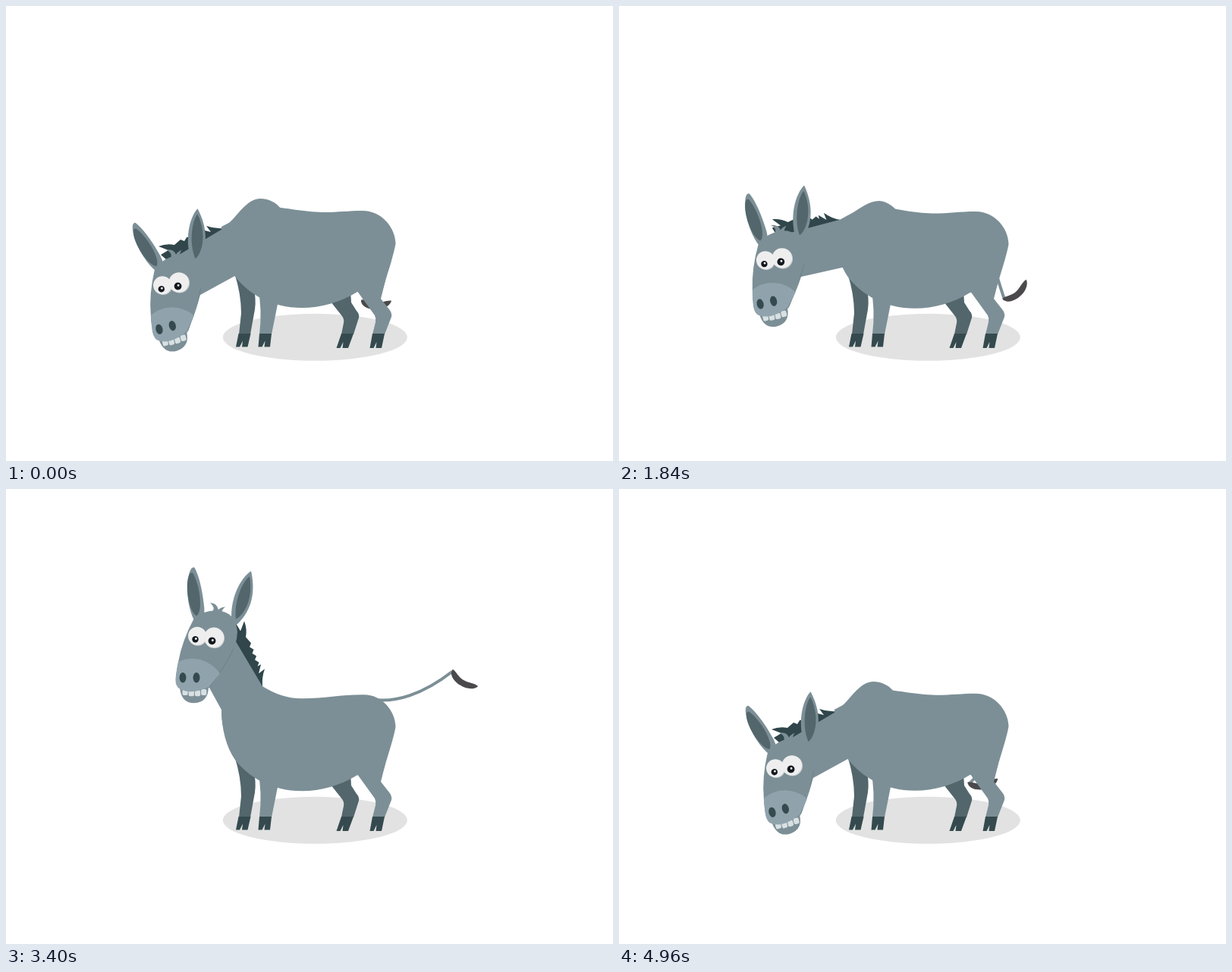
Animation, 800 px wide and 600 px high, one loop 5 s. Source, as an HTML page with a canvas:

```html
<!DOCTYPE html>
<html lang="en">
<head>
<meta charset="utf-8">
<title>Donkey</title>
<style>
html, body { margin: 0; width: 100%; height: 100%; overflow: hidden; background: #fff; }
canvas { display: block; }
</style>
</head>
<body>
<canvas id="stage" width="800" height="600"></canvas>
<script>
const ctx = document.getElementById('stage').getContext('2d');
const LOOP = 5000, STEP = 40, TAU = 2 * Math.PI, DEG = Math.PI / 180;
const COLOR = {
  coat: '#7c8f96', far: '#52666c', hoof: '#354a4e', mane: '#30464b', muzzle: '#90a3ad',
  line: '#6c8088', tooth: '#d8e0e3', tuft: '#4b494c', grass: '#9aae3d', ray: '#424247', shadow: '#e2e2e2'
};
const SHOULDER = [329, 302], SKULL = [266.8, 193.3];
const GRASS_START = 440, GRASS_END = 1660;
const BRAY_START = 2350, BRAY_LENGTH = 480;

const SHAPES = {
  tuft: 'M-1-3C5-3 10 2 18 2C26 2 32-2 39-1C38 5 28 11 18 10C8 10-2 5-1-3Z',
  farLegs: `M301 352Q310 380 310 405L307 433H322L328 400Q330 385 326 370Z
    M428 390L443 409Q446 413 445 418L442 433H458L465 411Q466 406 462 402L455 391L454 375Z`,
  nearLegs: `M332 372Q338 400 334 433H350L359 388Z
    M460 372L486 408Q488 412 487 417L483 433H499L508 410Q509 405 505 400L494 386L500 362L480 350Z`,
  mane: manePath(),
  neck: `M272 185L303 201L338 260L351 273C362 283 377 294 377 308C377 320 371 330 364 335
    Q345 350 325 349C296 346 284 325 284 291L250 229Z`,
  skull: 'M247 172Q258 160 278 160Q302 161 305 188Q304 206 296 220L268 262H228Q221 255 227 228Q232 200 247 172Z',
  cheek: 'M300 210Q292 228 281 243L269 260',
  muzzle: 'M227 228Q240 221 257 225Q273 230 282 243L268 260Q258 266 244 267Q234 267 227 262Q222 257 224 245Z',
  forelock: 'M271 163Q277 156 269 150Q278 150 280 159Q282 156 289 155Q285 158 284 163Z',
  leftEar: 'M248 103C240 105 235 145 248 173L259 172Q263 164 261 150Q258 120 251 105Q250 102 248 103Z',
  leftInner: 'M244 111C236 121 240 160 251 167C260 162 257 128 248 111Q246 109 244 111Z',
  rightEar: 'M323 108C310 116 293 145 298 180Q303 182 312 170C328 150 327 125 323 108Z',
  rightInner: 'M321 115C312 121 300 148 303 171C312 168 327 145 321 115Z'
};
for (const key in SHAPES) SHAPES[key] = new Path2D(SHAPES[key]);

function manePath() {
  let path = 'M296 185L303 177L309 187L314 174Q318 184 316 195';
  for (let i = 0; i < 4; i++) {
    const x = 321 + 3.5 * i, y = 203 + 8.5 * i;
    path += `L${x + 2} ${y}L${x} ${y + 5}`;
  }
  return path + 'L336 231L333 243L341 237Q337 248 338 260L325 260Z';
}

const mix = (a, b, k) => a + (b - a) * k;
const wave = (phase, peak) => Math.cos(TAU * (phase - peak));

// Eased 0 to 1 between two times.
function ramp(t, from, to) {
  const k = Math.min(1, Math.max(0, (t - from) / (to - from)));
  return k * k * (3 - 2 * k);
}

function poseAt(t) {
  const lift = ramp(t, 1700, 2220) - ramp(t, 4120, 4700);
  const dip = ramp(t, 60, 440) - ramp(t, 440, 1100);
  const recoil = 1 + 0.2 * wave(t / 384, 2520 / 384);
  const bray = (ramp(t, 2300, 2500) - ramp(t, 3160, 3360)) * recoil;
  return {
    lift, dip, bray,
    neck: -90 * (1 - lift) - 5.5 * dip,
    head: -15 * (1 - lift) + 5 * dip + 7 * bray,
    ear: -4 - 6 * wave(t / LOOP, 0) + 5 * bray + 5 * dip,
    bob: 1.3 * Math.sin(3 * TAU * t / LOOP)
  };
}

function fill(shape, color) {
  ctx.fillStyle = color;
  ctx.fill(shape);
}

function oval(x, y, rx, ry, color) {
  ctx.beginPath();
  ctx.ellipse(x, y, rx, ry, 0, 0, TAU);
  ctx.fillStyle = color;
  ctx.fill();
}

function group(draw) {
  ctx.save();
  draw();
  ctx.restore();
}

function turnAt(x, y, degrees) {
  ctx.translate(x, y);
  ctx.rotate(degrees * DEG);
  ctx.translate(-x, -y);
}

// A pendulum whose bend and tuft follow the swing with a delay.
function drawTail(phase) {
  const swing = 38 + 58 * wave(phase, 0.98) - 6 * Math.sin(3 * TAU * phase);
  const bend = -65 * wave(phase, 0.1);
  const tuft = -35 + 85 * wave(phase, 0.38);
  const reach = 114;
  group(() => {
    ctx.translate(480, 277);
    ctx.rotate(swing * DEG);
    ctx.beginPath();
    ctx.moveTo(0, 0);
    ctx.bezierCurveTo(reach * 0.25, bend * 0.8, reach * 0.6, bend * 0.8, reach, 0);
    ctx.strokeStyle = COLOR.coat;
    ctx.lineWidth = 4;
    ctx.stroke();
    ctx.translate(reach, 0);
    ctx.rotate(tuft * DEG);
    fill(SHAPES.tuft, COLOR.tuft);
  });
}

function drawHoof(top, bottom, y) {
  fill(new Path2D(`M${top} 432h16L${bottom + 15} ${y}h-7.5l1-8l-4 8h-5Z`), COLOR.hoof);
}

function drawBody(lift) {
  const up = (low, high) => mix(low, high, lift);
  fill(new Path2D(`M338 ${up(263, 260)}
    C${up(375, 355)} ${up(267, 270)} ${up(390, 370)} ${up(271, 276)} ${up(418, 390)} ${up(272, 276)}
    C${up(440, 420)} ${up(272, 276)} ${up(450, 440)} ${up(270, 271)} 470 ${up(270, 271)}
    C495 270 513 292 513.5 313C512 325 502 355 495 380L463 377
    C440 391 415 398 390 398C350 398 320 380 302 357C290 340 284 315 284 291Z`), COLOR.coat);
}

function drawTeeth(x, y, width, height, count) {
  ctx.fillStyle = COLOR.tooth;
  for (let i = 0; i < count; i++) {
    const arch = 2 * Math.sin(Math.PI * (i + 0.5) / count);
    ctx.beginPath();
    ctx.roundRect(x + i * (width + 1), y + arch, width, height, 2);
    ctx.fill();
  }
}

function drawEye(x, y, r, pupil, look) {
  oval(x + 0.8, y + 1, r, r, '#c9cfd2');
  oval(x, y, r, r, '#eeeeee');
  const px = x - 2.5 * look, py = y + 4.5 * look;
  oval(px, py, pupil, pupil, '#14191f');
  oval(px + 0.8, py - 0.8, 1.4, 1.4, '#fff');
}

function drawBlade(x, y, angle, length) {
  group(() => {
    ctx.translate(x, y);
    ctx.rotate(angle * DEG);
    const mid = length * 0.55;
    fill(new Path2D(`M-3 0Q${mid} 6 ${length} 0Q${mid}-6-3 0Z`), COLOR.grass);
  });
}

function drawGrass(t) {
  const eaten = (t - GRASS_START) / (GRASS_END - GRASS_START);
  if (eaten < 0 || eaten >= 1) return;
  const size = 1.05 * (1 - eaten ** 5);
  group(() => {
    ctx.translate(244, 270.5);
    ctx.rotate(12 * DEG);
    ctx.scale(size, size);
    for (const spread of [-1, 0, 1]) {
      drawBlade(-9, -1, 153 + 15 * spread, 34 + 3 * spread * spread);
      drawBlade(18, -5, -32 + 18 * spread, 29 + 3 * spread * spread);
    }
  });
}

function drawHead(t, { ear, bray, dip }) {
  const chin = 282 + 10 * bray + 2 * dip;
  group(() => {
    turnAt(253, 168, ear);
    fill(SHAPES.leftEar, COLOR.coat);
    fill(SHAPES.leftInner, COLOR.far);
  });
  fill(new Path2D(`M229 260Q230 ${chin} 248 ${chin}Q267 ${chin - 1} 267 260Z`), COLOR.coat);
  if (bray > 0.1) drawTeeth(235, 274, 5, 7 * bray, 4);
  drawTeeth(232.5, 263, 7.2, 8 + 2 * bray, 4);
  fill(SHAPES.forelock, COLOR.coat);
  fill(SHAPES.skull, COLOR.coat);
  ctx.strokeStyle = COLOR.line;
  ctx.lineWidth = 1;
  ctx.stroke(SHAPES.cheek);
  fill(SHAPES.muzzle, COLOR.muzzle);
  for (const x of [233, 251]) oval(x, 248.5, 4.5, 6.7, COLOR.hoof);
  const look = 1 - Math.min(1, bray);
  drawEye(252, 193.5, 12, 4.2, look);
  drawEye(274, 195.5, 13.2, 4.9, look);
  fill(SHAPES.rightEar, COLOR.coat);
  fill(SHAPES.rightInner, COLOR.far);
  drawGrass(t);
}

function drawRays(t) {
  const count = (t - BRAY_START) / BRAY_LENGTH;
  if (count < 0 || count >= 2) return;
  const p = count % 1, inner = mix(29, 112, p);
  const grow = Math.min(1, p * 4, (1 - p) * 4);
  ctx.strokeStyle = COLOR.ray;
  ctx.lineWidth = 3;
  ctx.lineCap = 'round';
  for (let i = 0; i < 3; i++) {
    const angle = (174 - 28.5 * i) * DEG, outer = inner + (27 - 4 * i) * grow;
    ctx.beginPath();
    for (const r of [inner, outer]) ctx.lineTo(239 + r * Math.cos(angle), 254 + r * Math.sin(angle));
    ctx.stroke();
  }
}

function draw(t) {
  const pose = poseAt(t);
  const { neck, head, bray, bob, lift } = pose;
  const turnNeck = () => {
    ctx.translate(0, bob * lift - 4 * bray);
    turnAt(...SHOULDER, neck);
  };
  ctx.clearRect(0, 0, 800, 600);
  oval(407.3, 436.8, 121.5, 31, COLOR.shadow);
  drawTail(t % 1000 / 1000);
  fill(SHAPES.farLegs, COLOR.far);
  drawHoof(306.5, 303.5, 449.5);
  drawHoof(442, 436, 451);
  group(() => {
    turnNeck();
    fill(SHAPES.mane, COLOR.mane);
  });
  group(() => {
    ctx.translate(0, bob);
    drawBody(lift);
  });
  fill(SHAPES.nearLegs, COLOR.coat);
  drawHoof(334, 333, 449.5);
  drawHoof(483, 480, 451);
  group(() => {
    turnNeck();
    fill(SHAPES.neck, COLOR.coat);
  });
  group(() => {
    turnNeck();
    ctx.translate(0, -6 * bray);
    turnAt(...SKULL, head - neck);
    drawHead(t, pose);
  });
  group(() => drawRays(t));
}

const start = performance.now();
function frame() {
  const t = (performance.now() - start) % LOOP;
  draw(Math.floor(t / STEP) * STEP);
  requestAnimationFrame(frame);
}
frame();
</script>
</body>
</html>
```
